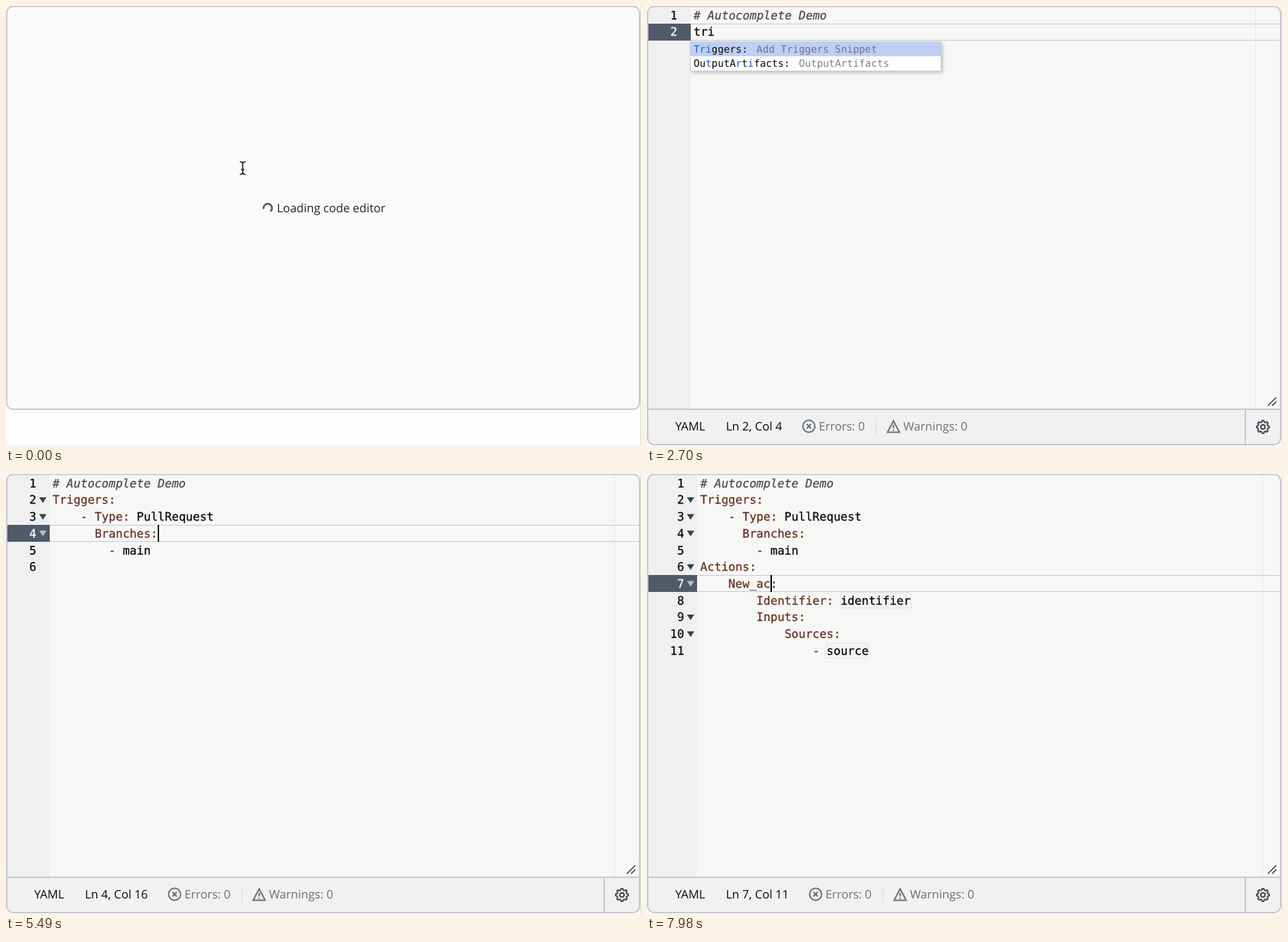
Write an HTML page with a canvas that moves like this. It is 900x623 px and loops after 8000 ms.

```html
<!DOCTYPE html>
<html lang="en">
<head>
<meta charset="utf-8">
<title>Code editor autocomplete</title>
<style>
html, body { margin: 0; width: 100%; height: 100%; overflow: hidden; background: #fdfdfd; }
canvas { display: block; }
</style>
</head>
<body>
<canvas id="stage" width="900" height="623"></canvas>
<script>
const ctx = document.getElementById('stage').getContext('2d');
ctx.textRendering = 'geometricPrecision';

const LOOP = 8000, READY = 210, FIRST_KEY = 640;
const TOP = 1.1, ROW = 23.72, CH = 9.94, MENU_ROW = 20.2;
const MONO = '"DejaVu Sans Mono", monospace', SANS = '"Open Sans", sans-serif';
const CODE = '16.5px ' + MONO, MENU = '14.2px ' + MONO, UI = '16.6px ' + SANS;
const BORDER = '#c6c8d2', SLATE = '#505a68', KEY = '#662f20', GREY = '#68707f', RED = '#d10a0f';
const PAPER = '#f7f7f5', INK = '#080808';

// ---------- script of the session ----------
const states = [];
let now = { t: 0, lines: [''], row: 1, col: 0, menu: null, boxes: [], sel: 0, errors: 0 };

function at(t, change = {}) {
  now = { ...now, ...change, t };
  states.push(now);
}

function type(t, step, text, extra = () => ({})) {
  [...text].forEach((c, i) => {
    const lines = [...now.lines], old = lines[now.row - 1];
    lines[now.row - 1] = old.slice(0, now.col) + c + old.slice(now.col + now.sel);
    at(t + i * step, { lines, col: now.col + 1, sel: 0, ...extra(i + 1) });
  });
}

const menu = (typed, items, pick = 0) => ({ menu: { typed, items, pick } });
const CLOSED = { menu: null };

at(0);
type(FIRST_KEY, 70, '# Autocomplete Demo');
at(2070, { lines: [...now.lines, ''], row: 2, col: 0 });
const triggerItems = [['Triggers:', 'Add Triggers Snippet'], ['OutputArtifacts:', 'OutputArtifacts']];
type(2270, 95, 'tri', n => n > 1 ? menu('tri'.slice(0, n), triggerItems) : {});

const header = ['# Autocomplete Demo', 'Triggers:', '    - Type: PullRequest', '      Branches:', '        - main'];
at(2880, { ...CLOSED, lines: header, row: 3, col: 12, sel: 11, boxes: [[5, 10, 4]] });
at(3500, { row: 5, col: 10, sel: 4, boxes: [[3, 12, 11]] });
type(3850, 100, 'main', n => n > 1 ? menu('main'.slice(0, n), [['SchemaVersion', 'SchemaVersion']]) : {});
at(4560, { ...CLOSED, boxes: [] });
at(4800, { lines: [...header, ''], row: 6, col: 0 });
at(5150, { row: 5, col: 14 });
at(5350, { row: 4, col: 15 });
at(5640, { row: 5, col: 14 });
at(5820, { row: 6, col: 0 });

const actionItems = [['Action', 'Add a single action'], ['Actions', 'Add actions section to workflow']];
type(6080, 100, 'Actio', n => ({ ...(n > 1 ? menu('Actio'.slice(0, n), actionItems) : {}), errors: n > 3 ? 1 : 0 }));
at(6870, menu('Actio', actionItems, 1));
at(7080, {
  ...CLOSED,
  lines: [...header, 'Actions:', '    ActionName:', '        Identifier: identifier', '        Inputs:',
    '            Sources:', '                - source'],
  row: 7, col: 4, sel: 10, errors: 0, boxes: [[8, 20, 10], [11, 18, 6]]
});
type(7390, 100, 'New_ac');

// ---------- drawing helpers ----------
function fill(color, x, y, w, h) {
  ctx.fillStyle = color;
  ctx.fillRect(x, y, w, h);
}

function text(str, x, y, color, font, align = 'left') {
  ctx.font = font;
  ctx.textAlign = align;
  ctx.fillStyle = color;
  ctx.fillText(str, x, y);
  return ctx.measureText(str).width;
}

// Code text carries a hairline outline for a slightly heavier weight.
function code(str, x, y, color, style = '', align) {
  text(str, x, y, color, style + CODE, align);
  ctx.strokeStyle = color;
  ctx.lineWidth = 0.25;
  ctx.strokeText(str, x, y);
}

function stroke(color, width, path) {
  ctx.strokeStyle = color;
  ctx.lineWidth = width;
  ctx.stroke(new Path2D(path));
}

function panel(h, color) {
  ctx.beginPath();
  ctx.roundRect(1, 0.5, 897, h, 9);
  ctx.fillStyle = color;
  ctx.fill();
}

function frame(h) {
  ctx.beginPath();
  ctx.roundRect(1, 0.5, 897, h, 9);
  ctx.strokeStyle = BORDER;
  ctx.lineWidth = 2;
  ctx.stroke();
}

function beam() {
  const shape = 'M331.5 220.5Q335.5 220.5 335.5 224V235Q335.5 238.5 331.5 238.5' +
    'M339.5 220.5Q335.5 220.5 335.5 224M335.5 235Q335.5 238.5 339.5 238.5M333 231.5H338';
  stroke('#fff', 3, shape);
  stroke('#111', 1.5, shape);
}

function drawLoading(t) {
  panel(570.5, '#fafafa');
  frame(570.5);
  const a = t / 700 * 2 * Math.PI;
  ctx.beginPath();
  ctx.arc(371, 286, 6, a + 2.9, a + 2 * Math.PI + 0.9);
  ctx.strokeStyle = SLATE;
  ctx.lineWidth = 2.6;
  ctx.stroke();
  text('Loading code editor', 384, 292, '#1d2939', UI);
}

// ---------- editor ----------
const rowTop = n => TOP + (n - 1) * ROW;

function drawLine(line, x, y) {
  if (line[0] === '#') return code(line, x, y, '#4f4754', 'italic ');
  const [, indent, dash, key, rest] = line.match(/^( *)(- )?(\w+:)?(.*)$/);
  let col = indent.length;
  for (const [part, color] of [[dash, KEY], [key, KEY], [rest, INK]]) {
    if (!part) continue;
    code(part, x + col * CH, y, color);
    col += part.length;
  }
}

function drawMenu({ typed, items, pick }, x, y) {
  const w = 356, h = items.length * MENU_ROW + 2;
  ctx.save();
  ctx.shadowColor = 'rgba(0,0,0,.25)';
  ctx.shadowBlur = 5;
  ctx.shadowOffsetX = 2;
  ctx.shadowOffsetY = 3;
  fill('#d3d3d3', x, y, w, h);
  ctx.restore();
  fill('#fdfdfd', x + 1, y + 1, w - 2, h - 2);
  items.forEach(([name, meta], i) => {
    const top = y + 1 + i * MENU_ROW, base = top + 15;
    if (i === pick) fill('#bfcff4', x, top, w, MENU_ROW);
    let hit = 0, tx = x + 5;
    for (const c of name) {
      const match = hit < typed.length && c.toLowerCase() === typed[hit].toLowerCase();
      if (match) hit++;
      tx += text(c, tx, base, match ? '#1a5fd0' : INK, MENU);
    }
    text(meta, tx + 12.5, base, i === pick ? '#6c7488' : '#808080', MENU);
  });
}

function drawStatus(s) {
  fill('#f1f1f1', 2, 572, 895, 48);
  fill(BORDER, 1, 570, 897, 2);
  fill(BORDER, 847, 571, 2, 50);
  text('YAML', 40, 601, INK, UI);
  let x = 112;
  x += text(`Ln ${s.row}, Col ${s.col + 1}`, x, 601, INK, UI) + 28.5;

  const color = s.errors ? RED : GREY;
  stroke(color, 2, `M${x + 1} 595a8.5 8.5 0 1 0 17 0a8.5 8.5 0 1 0 -17 0M${x + 6.3} 591.8l6.4 6.4m0 -6.4l-6.4 6.4`);
  x += 23.5;
  x += text('Errors: ' + s.errors, x, 601, color, (s.errors ? 'bold ' : '') + UI) + 15.5;
  fill('#d9dbe1', x, 583, 1, 25);
  x += 15.5;
  stroke(GREY, 2, `M${x + 9.5} 587.5L${x + 18} 603.5H${x + 1}ZM${x + 9.5} 593v5m0 1.5v2`);
  text('Warnings: 0', x + 23.5, 601, GREY, UI);

  // settings gear
  ctx.beginPath();
  for (let i = 0; i <= 96; i++) {
    const a = i / 96 * 2 * Math.PI;
    const r = 8 + Math.max(-0.9, Math.min(0.9, 2 * Math.cos(8 * a)));
    ctx.lineTo(873 + r * Math.cos(a), 596 + r * Math.sin(a));
  }
  ctx.closePath();
  ctx.moveTo(876, 596);
  ctx.arc(873, 596, 3, 0, 2 * Math.PI);
  ctx.strokeStyle = '#424956';
  ctx.lineWidth = 2;
  ctx.stroke();
}

function drawEditor(t) {
  const s = states.findLast(state => state.t <= t);
  const shift = s.lines.length > 9 ? 9.6 : 0;
  const left = 66 + shift, colX = c => left + c * CH;

  panel(620.5, PAPER);
  ctx.save();
  ctx.beginPath();
  ctx.roundRect(1, 0.5, 897, 620.5, 9);
  ctx.clip();
  const gutter = Math.round(61.5 + shift);
  fill('#f0f0f0', 2, 1, gutter - 2, 570);
  fill('#e6e6e8', Math.round(862 + shift), 1, 1, 570);

  const top = Math.round(rowTop(s.row)), bottom = Math.round(rowTop(s.row + 1));
  fill(BORDER, gutter, top, 897 - gutter, 1);
  fill(BORDER, gutter, bottom - 1, 897 - gutter, 1);
  fill(SLATE, 2, top, gutter - 2, bottom - top);

  for (const [row, col, n] of s.boxes) {
    ctx.fillStyle = 'rgba(194,193,208,.09)';
    ctx.strokeStyle = 'rgba(211,208,235,.62)';
    ctx.lineWidth = 1;
    ctx.beginPath();
    ctx.roundRect(colX(col) - 0.5, rowTop(row) + 1, n * CH + 1, ROW - 2, 3);
    ctx.fill();
    ctx.stroke();
  }
  if (s.sel) fill('rgba(39,95,255,.3)', colX(s.col), top, s.sel * CH, ROW);

  s.lines.forEach((line, i) => {
    const n = i + 1, active = n === s.row, y = rowTop(n) + 17.6;
    code(n, 43 + shift, y, active ? '#fff' : INK, '', 'right');
    if (/^[^#]*:$|^ *- \w+:/.test(line)) {
      ctx.fillStyle = active ? '#b9bec8' : '#39414d';
      ctx.fill(new Path2D(`M${47 + shift} ${y - 9.5}h10.4l-5.2 8z`));
    }
    drawLine(line, left, y);
  });

  const blinkOn = (t - s.t) % 400 < 200;
  if (blinkOn && t >= FIRST_KEY - 150) fill('#000', Math.round(colX(s.col + s.sel)), top, 2, bottom - top);

  stroke('#353b45', 1.5, 'M880 566L892 554M886 566L892 560');
  if (s.menu) drawMenu(s.menu, colX(s.col - s.menu.typed.length) - 5, bottom + 1);
  drawStatus(s);
  ctx.restore();
  frame(620.5);
}

function draw(ms) {
  const t = ms % LOOP;
  fill('#fdfdfd', 0, 0, 900, 623);
  fill('#dcdde2', 899, 0, 1, 623);
  if (t < READY) drawLoading(t);
  else drawEditor(t);
  if (t < FIRST_KEY) beam();
}

const start = performance.now();
function tick() {
  draw(performance.now() - start);
  requestAnimationFrame(tick);
}
tick();
</script>
</body>
</html>
```
